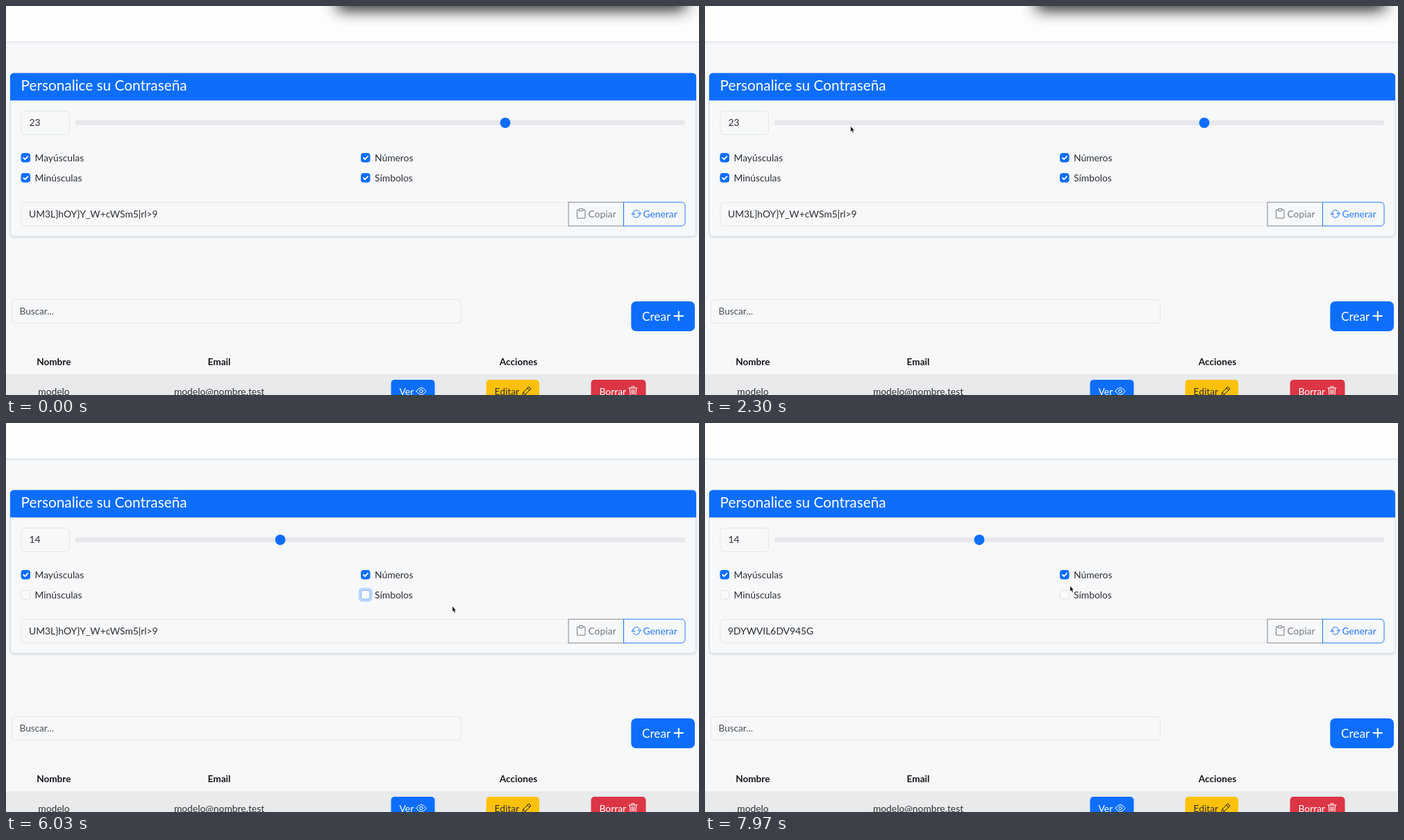
An HTML page for the animation above (8000 ms loop, 998x561 px).

```html
<!DOCTYPE html>
<html lang="es">
<head>
<meta charset="utf-8">
<title>Generador de contraseñas</title>
<style>
  html, body { margin: 0; width: 100%; height: 100%; overflow: hidden; background: #f6f8fa; }
  svg { display: block; width: 100%; height: 100%; font: 13.85px Lato, sans-serif; fill: #2b3035; }
  .blue { fill: #0d6efd; }
  .white { fill: #fff; }
  .bold { font-weight: 700; font-size: 13.6px; fill: #15181c; }
  .mid { text-anchor: middle; }
  .field { fill: none; stroke: #e3e7e8; }
  .icon { fill: none; stroke: currentColor; stroke-width: 1; stroke-linecap: round; stroke-linejoin: round; }
  .ring { fill: #0d6efd; fill-opacity: .25; }
</style>
</head>
<body>
<svg viewBox="0 0 998 561">
  <defs>
    <filter id="soft" x="-20%" y="-100%" width="140%" height="300%" color-interpolation-filters="sRGB"><feGaussianBlur stdDeviation="11"/></filter>
    <filter id="lift" x="-2%" y="-5%" width="104%" height="112%" color-interpolation-filters="sRGB">
      <feDropShadow dx="0" dy="1.2" stdDeviation="1.6" flood-color="#24406e" flood-opacity=".14"/>
    </filter>
    <path id="buttonShape" d="M889.5 283H973a5 5 0 0 1 5 5V312.200a5 5 0 0 1-5 5H889.500z"/>
  </defs>
  <rect width="998" height="561" fill="#f6f8fa"/>
  <rect x="-5" y="-10" width="1008" height="61" fill="#fdfdfc" filter="url(#lift)"/>
  <rect id="shade" x="477" y="-80" width="502" height="86" fill="#08080e" filter="url(#soft)"/>

  <rect x="6.300" y="96.800" width="987.400" height="235.500" rx="5" fill="#f6f8fa" stroke="#d3dcea" filter="url(#lift)"/>
  <path class="blue" d="M6 136.300V102a5 5 0 0 1 5-5.300H989a5 5 0 0 1 5 5.300V136.300z"/>
  <text class="white" x="21.500" y="122" font-size="20.800">Personalice su Contraseña</text>

  <rect class="field" x="22" y="151.500" width="69.500" height="34" rx="5"/>
  <text id="length" x="33.500" y="173.300"></text>
  <rect x="99.500" y="164.800" width="878.500" height="7.200" rx="3.600" fill="#e6e8eb"/>
  <g id="thumb">
    <g id="thumbRing"><circle class="ring" r="11.500"/><circle class="white" r="8.400"/></g>
    <circle class="blue" r="7.500"/>
  </g>

  <g id="checks"></g>

  <path class="field" d="M810 283.500H27a5 5 0 0 0-5 5V312a5 5 0 0 0 5 5H810"/>
  <text id="password" x="33" y="305"></text>
  <g color="#747c83">
    <rect x="810" y="283" width="79.500" height="34.200" fill="none" stroke="currentColor" stroke-width=".9"/>
    <path class="icon" d="M825 294h-2.500v12h11.500v-12h-2.500M826 292.500h5v3h-5z"/>
    <text x="838.500" y="305" fill="currentColor">Copiar</text>
  </g>
  <g id="generate">
    <use id="press" href="#buttonShape" fill="none" stroke="#0d6efd" stroke-opacity=".25" stroke-width="8"/>
    <use id="fill" href="#buttonShape" class="blue" stroke="#0d6efd" stroke-width=".9"/>
    <path class="icon" d="M903 298a5 5 0 0 1 9.300-1M912.500 301.500a5 5 0 0 1-9.300 1M901.300 300.300l1.900-2.400 2 2.400zM910.500 299l2 2.400 1.900-2.400z"/>
    <text x="917.500" y="305" fill="currentColor">Generar</text>
  </g>

  <rect class="field" x="8.500" y="423.500" width="647" height="34" rx="5"/>
  <text x="19.500" y="444.500" fill="#4b5157" style="font-size:13.600px">Buscar...</text>
  <rect class="blue" x="900.300" y="426" width="91.700" height="43" rx="7"/>
  <text class="white" x="916" y="453.500" font-size="17.200">Crear</text>
  <path d="M962.500 447h12.500M968.750 440.800v12.500" stroke="#fff" stroke-width="2" stroke-linecap="round"/>

  <g class="bold mid">
    <text x="68.800" y="518">Nombre</text>
    <text x="307" y="518">Email</text>
    <text x="738" y="518">Acciones</text>
  </g>
  <rect y="531" width="998" height="30" fill="#e8eaec"/>
  <g class="mid">
    <text x="69" y="560.500">modelo</text>
    <text x="307" y="560.500">modelo@nombre.test</text>
  </g>
  <g color="#fff">
    <rect class="blue" x="554.500" y="539" width="63" height="34" rx="5"/>
    <text class="white" x="566.500" y="560.500">Ver</text>
    <path class="icon" d="M591 555.500q7-10.500 14 0q-7 10.500-14 0z"/>
    <circle class="icon" cx="598" cy="555.500" r="2.300"/>
  </g>
  <g color="#212529">
    <rect x="691.500" y="539" width="76.500" height="34" rx="5" fill="#ffc107"/>
    <text x="703.500" y="560.500">Editar</text>
    <path class="icon" d="M743.500 561.500l1.500-4.500 8-8 3 3-8 8zM751 551l3 3M745 557l3 3"/>
  </g>
  <g color="#fff">
    <rect x="842.500" y="539" width="79" height="34" rx="5" fill="#dc3545"/>
    <text class="white" x="854.500" y="560.500">Borrar</text>
    <path class="icon" d="M897 551h12M901 550.500v-1.700h4v1.700M898.300 551l.8 11h7.800l.8-11M901 553.500l.2 6M903 553.500v6M905 553.500l-.2 6"/>
  </g>

  <g id="cursor">
    <path id="arrow" d="M0 0V7.800L1.600 6.300 3.100 9.300 4.400 8.700 3 5.800H5.200z" fill="#000" stroke="#fff" stroke-width=".4"/>
    <path id="hand" d="M-1 6V1q0-1 .9-1t.9 1V4.200L4.700 5q1.200.4 1.100 1.500L5.200 9 4.500 11H0L-1.200 8.500-3 6.300q0-1.300 1-.8z" fill="#fff" stroke="#343a4a" stroke-width=".75"/>
  </g>
</svg>
<script>
const LOOP = 8000;
const $ = id => document.getElementById(id);
const show = (el, visible) => { el.style.display = visible ? '' : 'none'; };
const clamp = v => Math.max(0, Math.min(1, v));
const ramp = (t, from, to) => clamp((t - from) / (to - from));

const SLIDE = 3060, GENERATE = 7300;
const HOVER = [6700, 7620];

// Pointer stops: time, x, y
const route = [
  [0, 40, 660], [480, 74, 566], [730, 99, 513], [1250, 125, 400], [1800, 165, 250],
  [2300, 209.5, 173.5], [2900, 383, 167], [3500, 383, 167], [4250, 29, 247], [4600, 29, 247],
  [4970, 244.5, 212], [5450, 517, 247], [5800, 517, 247], [6600, 953, 307],
  [7560, 953, 307], [7970, 526, 235], [8000, 520, 234]
];

// Boxes: label, x, y, time unchecked, time focus leaves
const boxes = [
  ['Mayúsculas', 21.5, 212], ['Números', 511, 212],
  ['Minúsculas', 21.5, 241, 4450, 5650], ['Símbolos', 511, 241, 5650, GENERATE]
].map(([label, x, y, off = Infinity, blur = Infinity]) => {
  $('checks').insertAdjacentHTML('beforeend', `<g transform="translate(${x} ${y})">
    <rect class="ring" x="-3.3" y="-3.3" width="20" height="20" rx="5.500"/>
    <rect x=".5" y=".5" width="12.500" height="12.500" rx="3"/>
    <path d="M3.800 7l2.200 2.200 4-4.300" fill="none" stroke="#fff" stroke-width="1.800" stroke-linecap="round" stroke-linejoin="round"/>
    <text x="20" y="11.700">${label}</text></g>`);
  const [ring, box, tick] = $('checks').lastElementChild.children;
  return { ring, box, tick, off, blur };
});

function pointerAt(t) {
  const i = Math.max(1, route.findIndex(stop => stop[0] >= t));
  const [t0, x0, y0] = route[i - 1], [t1, x1, y1] = route[i];
  const k = ramp(t, t0, t1);
  return [x0 + (x1 - x0) * k, y0 + (y1 - y0) * k];
}

function draw(t) {
  $('shade').setAttribute('opacity', .88 * (1 - ramp(t, 2800, 3150)));

  const value = t < SLIDE ? 23 : 14;
  $('length').textContent = value;
  $('thumb').setAttribute('transform', `translate(${395 + (value - 14) * 36} 168.400)`);
  show($('thumbRing'), t >= SLIDE && t < boxes[2].off);

  for (const { ring, box, tick, off, blur } of boxes) {
    const checked = t < off, focused = !checked && t < blur;
    show(ring, focused);
    show(tick, checked);
    box.setAttribute('fill', checked ? '#0d6efd' : '#f8fafc');
    box.setAttribute('stroke', checked ? '#0d6efd' : focused ? '#86b7fe' : '#e0e4e7');
  }

  $('password').textContent = t < GENERATE ? 'UM3L}hOY}Y_W+cWSm5|rl>9' : '9DYWVIL6DV945G';
  const hover = ramp(t, HOVER[0], HOVER[0] + 150) - ramp(t, HOVER[1], HOVER[1] + 150);
  const mix = (from, to) => Math.round(from + (to - from) * hover);
  $('fill').setAttribute('fill-opacity', hover);
  $('generate').style.color = `rgb(${mix(37, 255)},${mix(122, 255)},${mix(250, 255)})`;
  $('press').setAttribute('opacity', ramp(t, GENERATE - 100, GENERATE) - ramp(t, GENERATE, GENERATE + 150));

  const [x, y] = pointerAt(t);
  const onTrack = x > 100 && x < 978 && y > 165 && y < 172;
  const onButton = x > 810 && x < 978 && y > 283 && y < 317;
  show($('hand'), onTrack || onButton);
  show($('arrow'), !(onTrack || onButton));
  $('cursor').setAttribute('transform', `translate(${x} ${y})`);
}

const start = performance.now();
function frame() {
  draw((performance.now() - start) % LOOP);
  requestAnimationFrame(frame);
}
frame();
</script>
</body>
</html>
```
